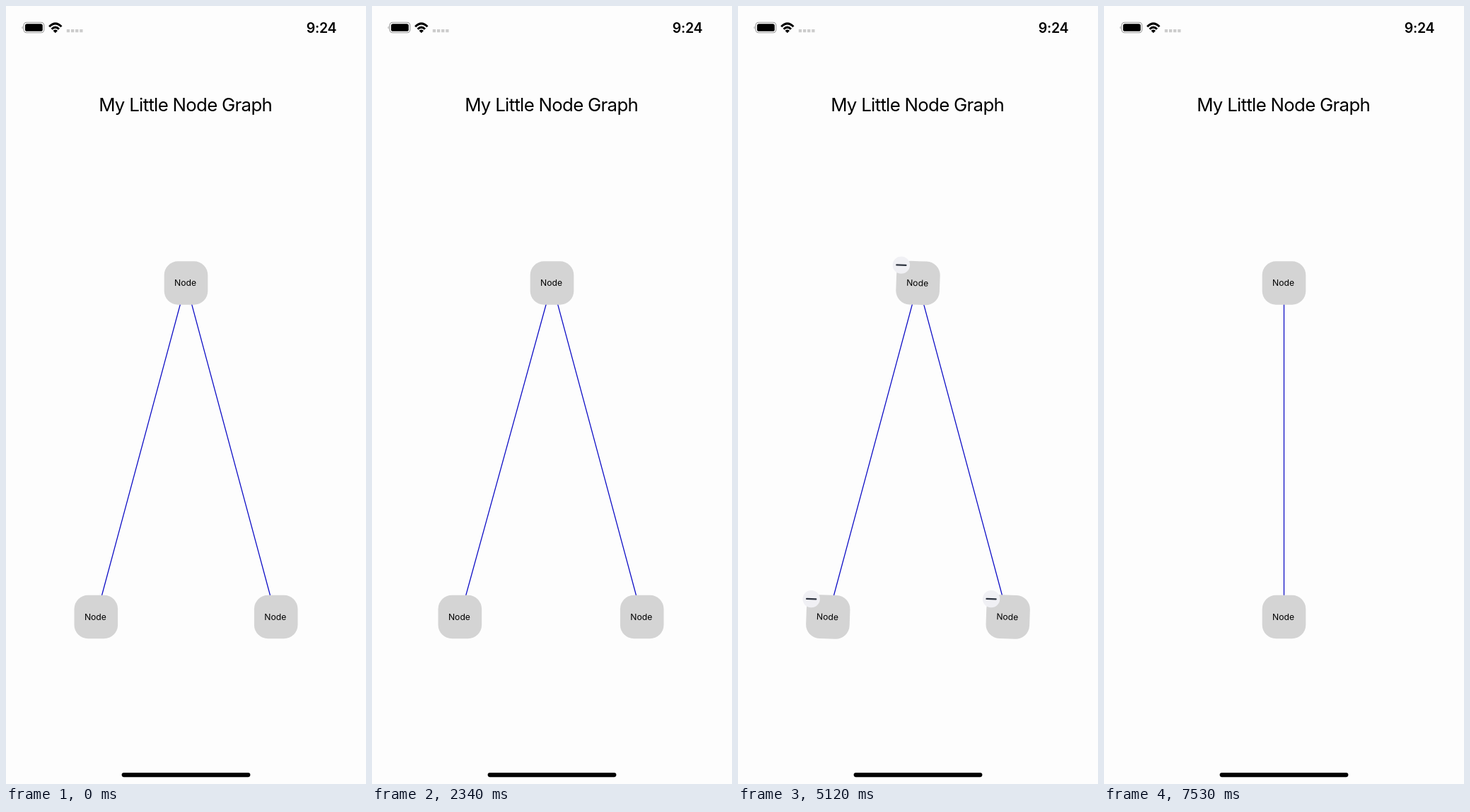
Recreate the animation shown at these times as an HTML page. Size 509x1101 px, loop 8 s.

```html
<!DOCTYPE html>
<html lang="en">
<head>
<meta charset="utf-8">
<title>Node graph</title>
<style>
  html, body { margin: 0; width: 100%; height: 100%; overflow: hidden; background: #fdfdfd; }
  svg { display: block; width: 100%; height: 100%; }
  text { font-family: Inter, "Liberation Sans", sans-serif; text-anchor: middle; }
  .title { font-size: 25.8px; letter-spacing: -.7px; }
  .clock { font-size: 19.5px; font-weight: 600; letter-spacing: -.3px; }
  .label { font-size: 12.2px; }
  .link { stroke: #0808c4; stroke-width: 1.25; }
  .box { fill: #d4d4d4; }
  .badge circle { fill: #f0f0f4; }
  .badge path { stroke: #2e3440; stroke-width: 2.2; stroke-linecap: round; }
  .wifi { fill: none; stroke: #000; stroke-width: 3; }
</style>
</head>
<body>
<svg viewBox="0 0 509 1101">
  <rect width="509" height="1101" fill="#fdfdfd"/>
  <g class="status">
    <path d="M23.5 28.2Q21.5 30.5 23.5 32.8Z" fill="#999"/>
    <rect x="25" y="23.2" width="28.8" height="14.6" rx="4.2" fill="none" stroke="#999" stroke-width="1.1"/>
    <rect x="27" y="25.2" width="24.8" height="10.6" rx="2.6"/>
    <path class="wifi" d="M61.2 29.2Q69.8 20.6 78.4 29.2M64.6 32.8Q69.8 27.6 75 32.8"/>
    <path d="M66.6 34.9Q69.8 32.3 73 34.9L69.8 38.2Z"/>
    <path d="M85.8 35.2H108.5" stroke="#ccc" stroke-width="4.2" stroke-dasharray="4.3 1.85"/>
    <text class="clock" x="446" y="37.5">9:24</text>
  </g>
  <text class="title" x="253.6" y="148.6">My Little Node Graph</text>
  <g id="links"></g>
  <g id="nodes"></g>
  <rect x="163.6" y="1085" width="181.8" height="6.2" rx="3.1"/>
</svg>
<script>
  const LOOP = 8000;
  const EDIT_START = 4470, EDIT_END = 7500;
  const REMOVE_AT = 6550, SLIDE = 500;
  const SWING = 2, SWING_PERIOD = 324, SWING_PEAK = 5120;

  const nodes = [
    { x: 254.5, y: 392, drag: { start: 500, release: 860, end: 1450, dx: 60, dy: 70 } },
    { x: 127.3, y: 864.5, drag: { start: 1460, release: 1920, end: 2700, dx: 86, dy: 0 } },
    { x: 381.7, y: 864.5, drag: { start: 2380, release: 2800, end: 3340, dx: -60, dy: -60 } }
  ];
  const [root, left, right] = nodes;

  const clamp = v => Math.min(1, Math.max(0, v));
  const ease = v => v * v * (3 - 2 * v);
  const progress = (t, start, length) => ease(clamp((t - start) / length));

  function add(parent, tag, attrs, html = '') {
    const el = document.createElementNS('http://www.w3.org/2000/svg', tag);
    for (const key in attrs) el.setAttribute(key, attrs[key]);
    el.innerHTML = html;
    return document.getElementById(parent).appendChild(el);
  }

  for (const node of nodes) {
    if (node !== root) node.link = add('links', 'line', { class: 'link' });
    node.el = add('nodes', 'g', {}, `
      <rect class="box" x="-30.8" y="-30.8" width="61.6" height="61.6" rx="19.5"/>
      <text class="label" x="-.9" y="4.2">Node</text>
      <g class="badge" transform="translate(-24.5 -24.5)">
        <circle r="12.2"/><path d="M-6.6 0H6.6"/>
      </g>`);
    node.badge = node.el.querySelector('.badge');
  }

  // Follows the finger, then springs back with a slight overshoot.
  function pull(t, { start, release, end }) {
    if (t < start || t >= end) return 0;
    if (t < release) return progress(t, start, release - start);
    const s = (t - release) / 1000;
    return Math.exp(-8 * s) * Math.cos(7.5 * s);
  }

  function render(t) {
    const edit = progress(t, EDIT_START, 200) * (1 - progress(t, EDIT_END - 150, 150));
    const angle = edit * SWING * Math.cos((t - SWING_PEAK) / SWING_PERIOD * 2 * Math.PI);
    const removed = progress(t, REMOVE_AT, SLIDE);

    for (const node of nodes) {
      const amount = pull(t, node.drag);
      node.px = node.x + node.drag.dx * amount;
      node.py = node.y + node.drag.dy * amount;
    }
    left.px += (root.x - left.x) * removed;

    for (const node of nodes) {
      const alpha = node === right ? 1 - progress(t, REMOVE_AT, 300) : 1;
      node.el.setAttribute('transform', `translate(${node.px} ${node.py}) rotate(${angle})`);
      node.el.setAttribute('opacity', alpha);
      node.badge.setAttribute('opacity', edit);
      if (!node.link) continue;
      const ends = { x1: root.px, y1: root.py, x2: node.px, y2: node.py, opacity: alpha };
      for (const key in ends) node.link.setAttribute(key, ends[key]);
    }
  }

  const origin = performance.now();
  function tick() {
    render((performance.now() - origin) % LOOP);
    requestAnimationFrame(tick);
  }
  tick();
</script>
</body>
</html>
```
